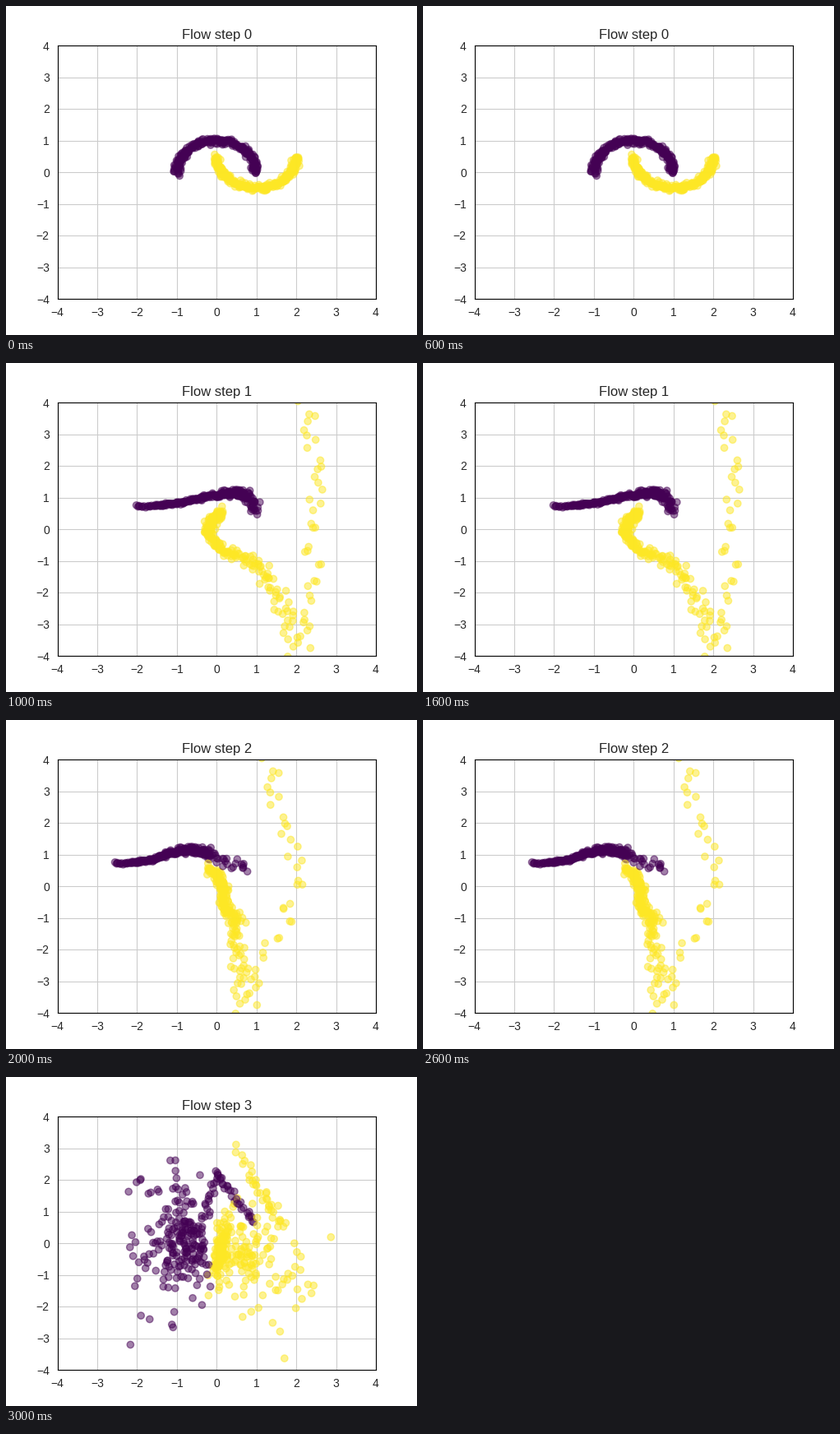
These frames come from a looping animation (500 px wide and 400 px high, 4 s). A matplotlib script:

```python
import numpy as np
import matplotlib.pyplot as plt
from matplotlib.animation import FuncAnimation

plt.rcParams.update({
    "font.family": "Liberation Sans", "text.color": ".15",
    "xtick.color": ".15", "ytick.color": ".15",
    "xtick.bottom": False, "ytick.left": False,
    "axes.grid": True, "axes.axisbelow": True,
    "grid.color": ".8", "grid.linestyle": "-",
})

COUNT = 250
PURPLE, YELLOW = 0, 1
rng = np.random.default_rng(7)


def to_data(points):
    """Stage pixels to axis units."""
    return (points - np.array([256.25, 202])) / [48.4375, -38.5]


def along(knots, u):
    """Columns of knots, the first being the curve parameter, read at u."""
    knots = np.array(knots, float)
    return np.array([np.interp(u, knots[:, 0], col) for col in knots.T[1:]])


def cloud(n, center, spread):
    return rng.normal(center, spread, (n, 2))


def chain(n, knots, spread):
    path = along(knots, np.linspace(0, 1, n)).T
    return path + rng.normal(0, spread, path.shape)


def keep_side(points, edge, side):
    """Fold points over a vertical edge so that all lie on one side."""
    points[:, 0] = edge + side * np.abs(points[:, 0] - edge)
    return points


def moons():
    t = np.linspace(0, np.pi, COUNT)
    upper = np.column_stack([np.cos(t), np.sin(t)])
    lower = np.column_stack([1 - np.cos(t), 0.5 - np.sin(t)])
    return [m + rng.normal(0, 0.05, m.shape) for m in (upper, lower)]


def coupled(knots, u, spread):
    """Two steps that share y and move only x."""
    x1, x2, y = along(knots, u)
    dx, dy = rng.normal(0, 1, (2, len(u))) * spread
    return np.array([np.column_stack([x + dx, y + dy]) for x in (x1, x2)])


# Parameter, x in step 1, x in step 2, shared y
PURPLE_PATH = [(0, 158, 132, 174), (.06, 183, 154, 174), (.25, 212, 178, 170),
               (.5, 256, 204, 161), (.72, 280, 225, 157), (.93, 297, 253, 165),
               (1, 306, 296, 183)]
YELLOW_PATH = [(0, 264, 247, 181), (.14, 253, 256, 188), (.4, 243, 264, 205),
               (.6, 266, 266, 229), (.76, 300, 280, 243), (.85, 322, 280, 264),
               (.93, 338, 284, 298), (1, 354, 289, 352)]
FAR_PATH = [(0, 360, 316, 48), (.25, 375, 330, 120), (.5, 376, 362, 195),
            (.65, 372, 340, 238), (.8, 370, 313, 285), (1, 368, 303, 346)]


def stretched():
    u = np.linspace(0, 1, COUNT)
    purple = coupled(PURPLE_PATH, u, 0.8 + 3.2 * u ** 2)
    u = np.linspace(0, 1, 205)
    near = coupled(YELLOW_PATH, u, 2.8 + 4 * u ** 4)
    far = coupled(FAR_PATH, np.linspace(0, 1, 36), 6)
    return zip(purple, np.concatenate([near, far], axis=1))


def scattered():
    """Each class has a dense core, a loose halo and a thin chain."""
    left = keep_side(np.vstack([cloud(140, (220, 198), (16, 28)),
                                cloud(65, (190, 195), (26, 50))]), 249, -1)
    arc = chain(45, [(0, 240, 172), (.35, 258, 118), (.55, 266, 129),
                     (1, 303, 178)], 2.3)

    band = cloud(110, (262, 211), (4.5, 21))
    band[:, 0] -= 0.15 * (band[:, 1] - 211)
    right = keep_side(np.vstack([cloud(75, (289, 215), (15, 24)),
                                 cloud(38, (325, 232), (28, 42))]), 256, 1)
    slope = chain(32, [(0, 283, 86), (.2, 297, 115), (1, 338, 182)], 4)
    return np.vstack([left, arc]), np.vstack([band, right, slope])


def mixed(purple, yellow):
    """Join both classes in a shuffled drawing order."""
    points = np.vstack([purple, yellow])
    labels = np.repeat([PURPLE, YELLOW], [len(purple), len(yellow)])
    order = rng.permutation(len(points))
    return points[order], labels[order]


def build_steps():
    steps = [mixed(*moons())]
    for pair in [*stretched(), scattered()]:
        steps.append(mixed(*map(to_data, pair)))
    return steps


STEPS = build_steps()
fig, ax = plt.subplots(figsize=(5, 4), dpi=100)


def draw(step):
    ax.clear()
    points, labels = STEPS[step]
    ax.scatter(*points.T, c=labels, cmap="viridis", alpha=0.5)
    ax.set(xlim=(-4, 4), ylim=(-4, 4), title=f"Flow step {step}",
           xticks=range(-4, 5), yticks=range(-4, 5))


animation = FuncAnimation(fig, draw, frames=len(STEPS), init_func=lambda: None,
                          interval=1000, repeat=True)
plt.show()
```
